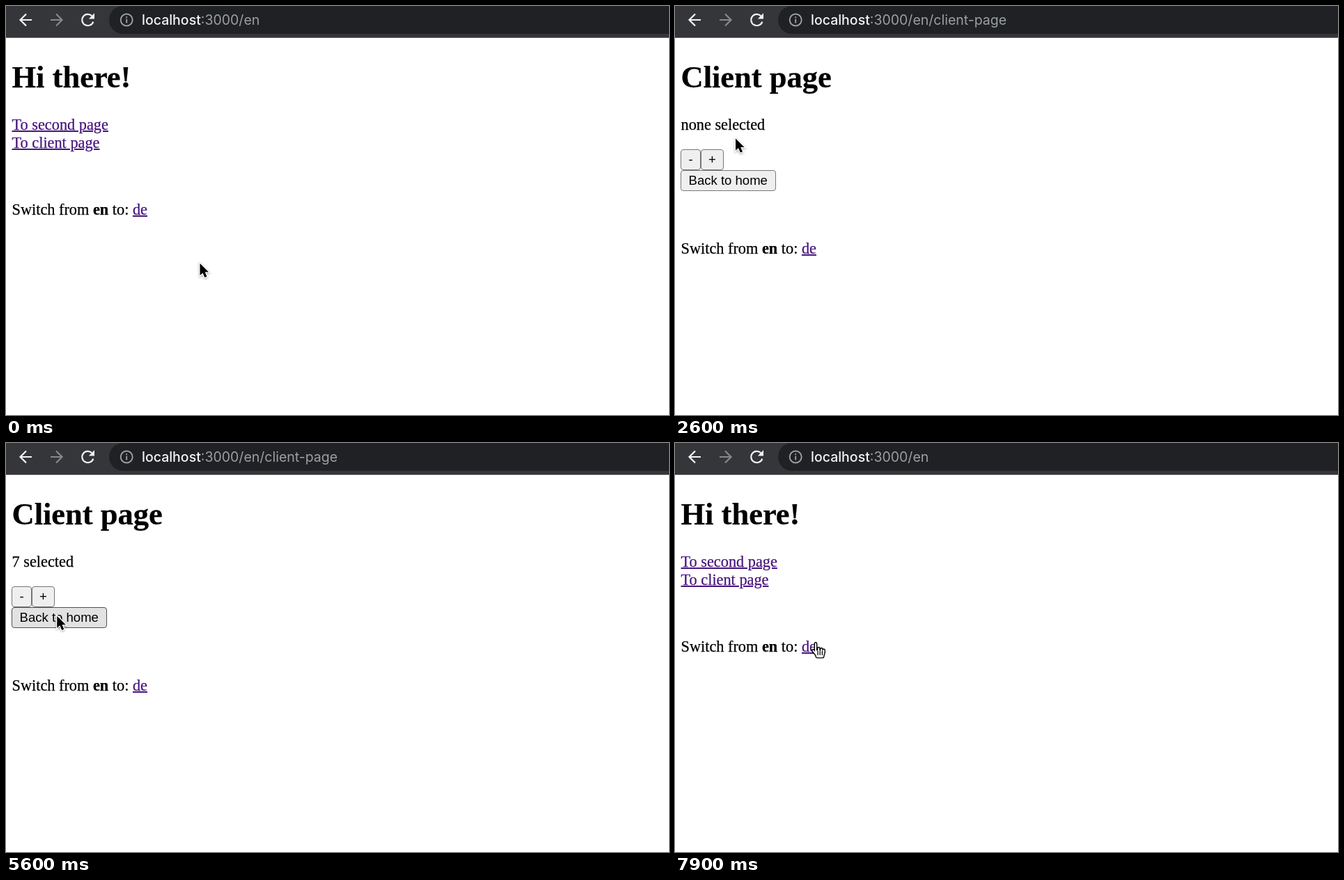
An HTML page that plays this animation: 952 px wide and 588 px high, repeating every 8 s.

```html
<!DOCTYPE html>
<html lang="en">
<head>
<meta charset="utf-8">
<title>Language switch demo</title>
<style>
  html, body { margin: 0; width: 100%; height: 100%; overflow: hidden; background: #fff; }
  body { position: relative; cursor: default; }
  svg { position: absolute; left: 0; top: 0; pointer-events: none; }
  .line, h1, .btn, #url { position: absolute; margin: 0; white-space: pre; }
  .line, h1 {
    left: 8.5px; color: #000; font: 22.3px/26px "Liberation Serif", serif;
    -webkit-text-stroke: .25px;
  }
  h1 { top: 77px; font-size: 44.5px; line-height: 50px; font-weight: bold; }
  .link { color: #48157f; text-decoration: underline; text-decoration-thickness: 1.6px; }
  .btn {
    box-sizing: border-box; height: 30px; text-align: center; color: #000;
    font: 18.55px/27px "Liberation Sans", sans-serif;
    background: #efefef; border: 1.4px solid #767676; border-radius: 4px;
  }
  .btn.hover { background: #e2e2e2; border-color: #4f4f4f; }
  .btn.hover.down { background: #f5f5f5; border-color: #8d8d8d; }
  #url { left: 195px; top: 0; color: #9aa0a6; font: 19.5px/40px Inter, sans-serif; }
  #url b { color: #f1f3f4; font-weight: 450; }
  #arrow { filter: drop-shadow(0 1.5px 1.5px rgba(0, 0, 0, .35)); }
</style>
</head>
<body>
<svg width="952" height="48">
  <defs>
    <path id="left" d="M17 0H1M9 -8.5L.5 0L9 8.5"/>
    <path id="palm" d="M0 3V14M4.3 10V16M8.300 11V16M11.600 12.500V16M-3.500 13L2 20M0 14H11.600L10 21.700H2Z"/>
    <path id="stem" d="M-4 -10Q0 -10 0 -7V7Q0 10 -4 10M4 -10Q0 -10 0 -7M0 7Q0 10 4 10"/>
  </defs>
  <rect width="952" height="45" fill="#35363a"/>
  <rect y="45" width="952" height="1" fill="#66676a"/>
  <rect x="148" width="840" height="40" rx="20" fill="#202124"/>
  <g fill="none" stroke-width="2.2">
    <use href="#left" x="20" y="20" stroke="#f1f3f4"/>
    <use href="#left" stroke="#86888c" transform="translate(81 20) scale(-1 1)"/>
    <path stroke="#f1f3f4" d="M125.300 22.600A8.200 8.200 0 1 1 123.300 14.200"/>
    <path fill="#f1f3f4" d="M127 10.300V18.500H118.800Z"/>
    <g stroke="#9aa0a6" stroke-width="1.9">
      <circle cx="173.2" cy="20" r="8.5"/>
      <path d="M173.200 18.800V24.400M173.200 15.200V17.200"/>
    </g>
  </g>
</svg>
<div id="url"><b>localhost</b>:3000/en<span id="tail">/client-page</span></div>

<div id="home">
  <h1>Hi there!</h1>
  <div class="line" style="top:158px"><span class="link">To second page</span></div>
  <div class="line" style="top:184px"><span class="link">To client page</span></div>
</div>
<div id="client">
  <h1>Client page</h1>
  <div class="line" id="count" style="top:158px"></div>
  <div class="btn" style="left:8px;top:206px;width:29px">-</div>
  <div class="btn" style="left:37px;top:206px;width:33px">+</div>
  <div class="btn" style="left:8px;top:236px;width:136.5px">Back to home</div>
</div>
<div class="line" id="lang">Switch from <b>en</b> to: <span class="link">de</span></div>

<svg width="952" height="588">
  <g id="pointer" fill="none">
    <circle id="ring" r="29.7" stroke="#000" stroke-width="2"/>
    <path id="arrow" fill="#000" stroke="#fff" stroke-width="2.6" paint-order="stroke"
      d="M0 0V17.300L4 13.700L6.900 20.300L10 19L7.200 12.500H12.500Z"/>
    <g id="hand" stroke-linecap="round" stroke-linejoin="round">
      <use href="#palm" stroke="#000" stroke-width="4.8"/>
      <use href="#palm" stroke="#fff" stroke-width="2" fill="#fff"/>
      <path d="M3 14V19M6.200 14V19M9.400 14V19" stroke="#000" stroke-width="1.3"/>
    </g>
    <g id="beam">
      <use href="#stem" stroke="#fff" stroke-width="3"/>
      <use href="#stem" stroke="#000" stroke-width="1.4"/>
    </g>
  </g>
</svg>

<script>
const LOOP = 8000, STEP = 100;
const OPEN = 2200, CLOSE = 6600;
const $ = id => document.getElementById(id);

const start = { x: 278.5, y: 370 };
const move = (from, to, x, y) => ({ from, to, x, y });
const moves = [
  move(0, 200, 147, 258),
  move(400, 600, 286, 27),
  move(700, 1000, 87, 191.5),
  move(1000, 1200, 172, 275),
  move(1300, 1800, 87, 190.5),
  move(2600, 2900, 320, 28),
  move(3000, 3300, 57, 220.5),
  move(5400, 5700, 79, 258.5),
  move(7000, 7300, 112, 178),
  move(7300, 7900, 202, 285.5)
];

// bursts of clicks on the plus button, two steps apart
const burst = (from, n) => Array.from({ length: n }, (_, i) => from + i * 2 * STEP);
const adds = [...burst(3400, 4), ...burst(4300, 2), ...burst(5000, 1)];
const clicks = [OPEN - STEP, ...adds, 6200];

const ease = k => k * k * (3 - 2 * k);
const show = (id, on) => { $(id).style.display = on ? "" : "none"; };

function pointerAt(t) {
  let { x, y } = start;
  for (const m of moves) {
    const k = ease(Math.min(1, Math.max(0, (t - m.from) / (m.to - m.from))));
    x += (m.x - x) * k;
    y += (m.y - y) * k;
  }
  return { x, y };
}

// full while pressed, faint for one step after release
function ringAlpha(t) {
  const age = t - clicks.findLast(c => c <= t);
  return age < STEP ? 1 : age < 2 * STEP ? 0.4 : 0;
}

function draw(t) {
  const client = t >= OPEN && t < CLOSE;
  const { x, y } = pointerAt(t);
  const alpha = ringAlpha(t);

  show("home", !client);
  show("client", client);
  show("tail", client);
  $("lang").style.top = (client ? 336 : 279.5) + "px";
  const n = adds.filter(a => t >= a + STEP).length;
  $("count").textContent = (n || "none") + " selected";

  const under = document.elementFromPoint(x, y);
  for (const b of document.querySelectorAll(".btn")) {
    b.classList.toggle("hover", b === under);
    b.classList.toggle("down", alpha === 1);
  }

  const beam = y < 40;
  const hand = !!under && under.matches(".link");
  show("beam", beam);
  show("hand", hand);
  show("arrow", !beam && !hand);
  $("ring").setAttribute("opacity", alpha);
  $("pointer").setAttribute("transform", `translate(${x} ${y})`);
}

function tick() {
  const t = performance.now() % LOOP;
  draw(Math.floor(t / STEP) * STEP);
  requestAnimationFrame(tick);
}
tick();
</script>
</body>
</html>
```
